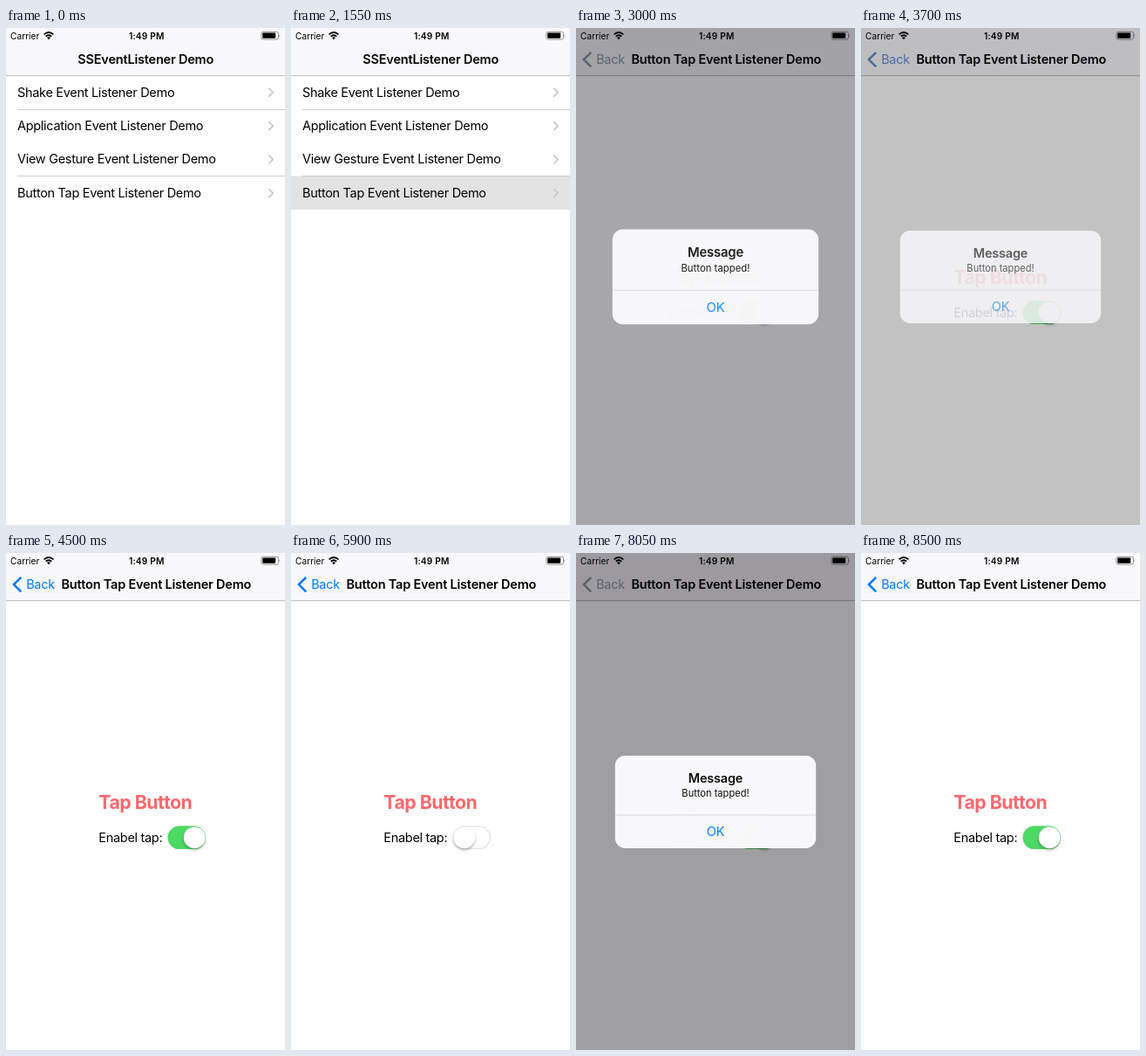
These frames come from a looping animation (320x569 px, 8550 ms). An HTML page:

```html
<!DOCTYPE html>
<html lang="en">
<head>
<meta charset="utf-8">
<title>Event listener demo</title>
<style>
  html, body { margin: 0; width: 100%; height: 100%; overflow: hidden; background: #fff; }
  svg { display: block; width: 100%; height: 100%; }
  text { font: 14.5px Inter, "Open Sans", sans-serif; letter-spacing: -.021em; white-space: pre; }
  .semi { font-weight: 600; letter-spacing: -.014em; }
  .mid { text-anchor: middle; }
  .status text { font-size: 10.2px; letter-spacing: 0; }
  .status .clock { font-weight: 600; letter-spacing: .02em; }
  #tap { font-size: 21.3px; font-weight: 700; letter-spacing: -.025em; fill: #fc676c; }
  .note { font-size: 11.1px; letter-spacing: 0; }
  .line { fill: none; stroke-linecap: butt; }
  #thumb { filter: drop-shadow(0 2px 1.5px rgba(0, 0, 0, .28)); }
</style>
</head>
<body>
<svg viewBox="0 0 320 569">
  <rect width="320" height="569" fill="#fff"/>

  <g id="list">
    <rect id="highlight" y="169.5" width="320" height="38.5" fill="#e3e3e4"/>
    <path d="M13 93.5H320M13 169.5H320" stroke="#c8c7cc" stroke-width=".9"/>
    <g id="rows"></g>
  </g>
  <rect id="listShade" y="55" width="320" height="514"/>

  <g id="page">
    <rect y="55" width="320" height="514" fill="#fff"/>
    <text id="tap" x="106.3" y="292.6">Tap Button</text>
    <text x="106.3" y="330.8">Enabel tap:</text>
    <rect x="186.2" y="313.2" width="42.2" height="25.2" rx="12.6" fill="#fff" stroke="#e3e3e3" stroke-width="1.3"/>
    <rect id="track" x="185.5" y="312.6" width="43.5" height="26.4" rx="13.2" fill="#4cd964"/>
    <circle id="thumb" cy="325.8" r="12.4" fill="#fff"/>
  </g>

  <rect width="320" height="55" fill="#f9f8fb"/>
  <path d="M0 54.6H320" stroke="#b4b3b6" stroke-width=".9"/>
  <text id="listTitle" class="semi mid" x="160.2" y="41.2">SSEventListener Demo</text>
  <text id="pageTitle" class="semi" x="63.4" y="41.2">Button Tap Event Listener Demo</text>
  <path id="chevron" class="line" d="M17.3 27.8L9 36.1L17.3 44.4" stroke-width="2.6"/>
  <text id="back" x="23.2" y="41.2">Back</text>

  <g class="status">
    <text x="5" y="12.6">Carrier</text>
    <g class="line" stroke="#000" stroke-width="1.9">
      <path d="M43.6 7.4Q49 2.8 54.4 7.4M45.7 9.6Q49 6.8 52.3 9.6"/>
    </g>
    <path d="M47 11Q49 9.4 51 11L49 13.2Z"/>
    <text class="clock mid" x="161.3" y="12.6">1:49 PM</text>
    <rect x="292.9" y="4.3" width="19.6" height="8.8" rx="2.2" fill="none" stroke="#777" stroke-width=".8"/>
    <rect x="294.2" y="5.6" width="15" height="6.2" rx="1"/>
    <path d="M313.5 7.2Q315 8.7 313.5 10.2Z" fill="#777"/>
  </g>

  <rect id="dim" width="320" height="569" fill="#040007"/>
  <g id="alert">
    <rect id="alertPanel" x="44.8" y="231.9" width="230.4" height="106" rx="11.5" fill="#f8f7f9"/>
    <g id="alertText">
      <path d="M44.8 300H275.2" stroke="#d0d0d3" stroke-width=".8"/>
      <text class="semi mid" x="160" y="262.7">Message</text>
      <text class="note mid" x="160" y="279.4">Button tapped!</text>
      <text class="mid" x="160" y="324.4" fill="#007aff">OK</text>
    </g>
  </g>
</svg>
<script>
const LOOP = 8550, STEP = 50;
const PUSH = 1615;
const ALERTS = [[2805, 3625], [7085, 8030]];
const TAPS = [2650, 5400, 6930];
const SWITCH_OFF = 4800, SWITCH_ON = 6400;

const $ = id => document.getElementById(id);
const clamp = v => Math.max(0, Math.min(1, v));
const set = (id, attrs) => {
  for (const name in attrs) $(id).setAttribute(name, attrs[name]);
};
const shift = x => `translate(${x} 0)`;

// Critically damped spring: 0 before start, then settling at 1.
const spring = (t, start, speed = 18.26) => {
  const x = Math.max(0, t - start) / 1000 * speed;
  return 1 - Math.exp(-x) * (1 + x);
};
const ease = (t, start, length) => {
  const x = clamp((t - start) / length);
  return x * x * (3 - 2 * x);
};

$('rows').innerHTML = ['Shake', 'Application', 'View Gesture', 'Button Tap'].map((name, i) => `
  <g transform="translate(0 ${38.4 * i})">
    <text x="13" y="78.7">${name} Event Listener Demo</text>
    <path class="line" d="M301.2 68.9L306.2 73.8L301.2 78.7" stroke="#c7c7cc" stroke-width="1.7"/>
  </g>`).join('');

function drawPush(t) {
  const p = spring(t, PUSH), rest = 1 - p;
  set('highlight', { opacity: t >= 1550 ? 1 : 0 });
  set('list', { transform: shift(-96 * p) });
  set('listShade', { opacity: .1 * p });
  set('page', { transform: shift(320 * rest) });
  set('listTitle', { transform: shift(-121 * p), opacity: rest < .005 ? 0 : rest });
  set('pageTitle', { transform: shift(257 * (1 - spring(t, PUSH, 13.4))), opacity: clamp(p * 1.1) });
  set('back', { transform: shift(121 * rest), opacity: p });
  set('chevron', { opacity: p });
}

function drawControls(t) {
  const tap = TAPS.find(start => t >= start && t < start + 400);
  set('tap', { opacity: tap === undefined ? 1 : .2 + .8 * ease(t, tap + 100, 250) });
  const on = 1 - ease(t, SWITCH_OFF, 300) + ease(t, SWITCH_ON, 300);
  set('track', { opacity: on });
  set('thumb', { cx: 198.7 + 17.5 * on });
}

function drawAlert(t) {
  const [show, hide] = ALERTS[t < 5000 ? 0 : 1];
  const shown = spring(t, show);
  const visible = shown * (1 - spring(t, hide));
  set('dim', { opacity: .4 * visible });
  set('alert', { transform: `translate(160 284.9) scale(${1.2 - .2 * shown}) translate(-160 -284.9)` });
  // The frosted panel hides what is behind it faster than its text fades in.
  set('alertPanel', { opacity: 1 - (1 - visible) ** 2 });
  set('alertText', { opacity: visible });
  const mix = (from, to) => Math.round(from + (to - from) * visible);
  const tint = `rgb(${mix(0, 156)},${mix(122, 160)},${mix(255, 168)})`;
  set('back', { fill: tint });
  set('chevron', { stroke: tint });
}

function frame(now) {
  const t = Math.floor(now % LOOP / STEP) * STEP;
  drawPush(t);
  drawControls(t);
  drawAlert(t);
  requestAnimationFrame(frame);
}
frame(0);
</script>
</body>
</html>
```
